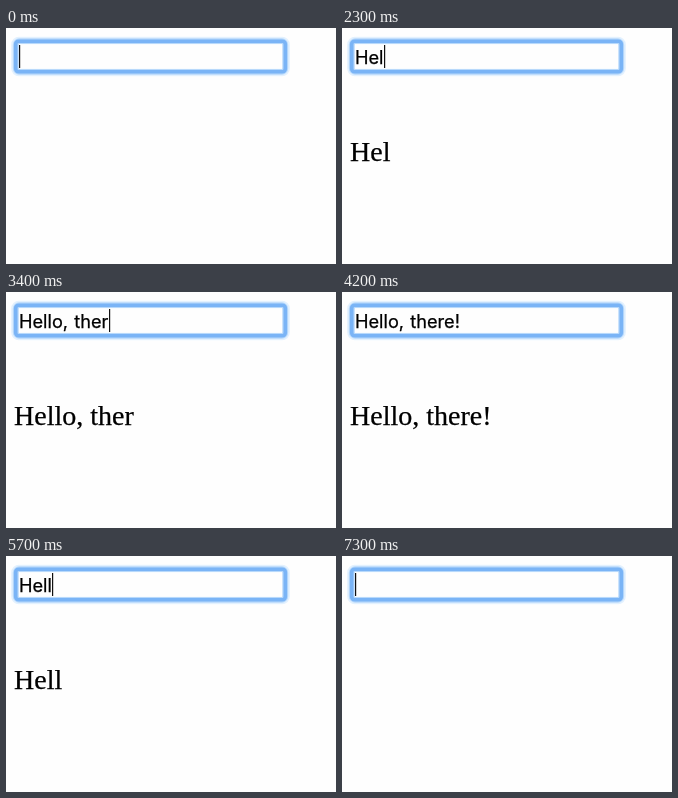
An HTML page for the animation above (7700 ms loop, 330 by 236 pixels).

```html
<!DOCTYPE html>
<html lang="en">
<head>
<meta charset="utf-8">
<title>Live text input</title>
<style>
  html, body { margin: 0; width: 100%; height: 100%; overflow: hidden; background: #fefefe; }
  svg { display: block; width: 330px; height: 236px; }
  text { white-space: pre; fill: #000; stroke: #000; stroke-width: 0.25px; }
  #field { font: 18.2px Inter, "Liberation Sans", sans-serif; font-optical-sizing: none; word-spacing: 1px; }
  #echo { font: 28px "Liberation Serif", serif; }
  .ring { fill: none; }
</style>
</head>
<body>
<svg viewBox="0 0 330 236">
  <rect class="ring" x="9" y="12.5" width="271" height="32" rx="4" stroke="#e3f1fe" stroke-width="7.6"/>
  <rect class="ring" x="9.7" y="13.2" width="269.6" height="30.6" rx="3.5" stroke="#b8d9fb" stroke-width="5.8"/>
  <rect class="ring" x="9.7" y="13.2" width="269.6" height="30.6" rx="3" stroke="#7ab4f6" stroke-width="3.6"/>
  <text id="field" x="13" y="36"></text>
  <rect id="caret" y="17" width="1.2" height="23" fill="#111"/>
  <text id="echo" x="8" y="133"></text>
</svg>
<script>
  const LOOP = 7700;
  const TICK = 100;
  const BLINK = 500;
  const PHRASE = "Hello, there!";
  const keys = PHRASE.match(/, |./g); // comma and space land together

  // A run of key presses, evenly spaced in time.
  const run = (start, gap, count) => Array.from({ length: count }, (_, i) => start + i * gap);
  const toTick = t => Math.floor(t / TICK) * TICK;

  const typed = [...run(2050, 150, 5), ...run(2900, 120, 6), 3700].map(toTick);
  const erased = [...run(4300, 300, 2), ...run(4900, 140, 11)].map(toTick);
  const presses = [700 - 2 * BLINK, ...typed, ...erased];

  const [field, caret, echo] = ["field", "caret", "echo"].map(id => document.getElementById(id));
  const countBy = (times, t) => times.filter(at => at <= t).length;

  function draw(t) {
    const full = keys.slice(0, countBy(typed, t)).join("");
    const text = full.slice(0, full.length - countBy(erased, t));
    if (field.textContent !== text) field.textContent = echo.textContent = text;

    // Each press restarts the blink with the caret visible.
    const idle = t - presses.findLast(at => at <= t);
    const width = text ? field.getComputedTextLength() + 0.5 : 0;
    caret.setAttribute("x", Math.round(13 + width));
    caret.setAttribute("opacity", idle % (2 * BLINK) < BLINK ? 1 : 0);
  }

  const start = performance.now();
  function tick() {
    draw((performance.now() - start) % LOOP);
    requestAnimationFrame(tick);
  }
  tick();
</script>
</body>
</html>
```
